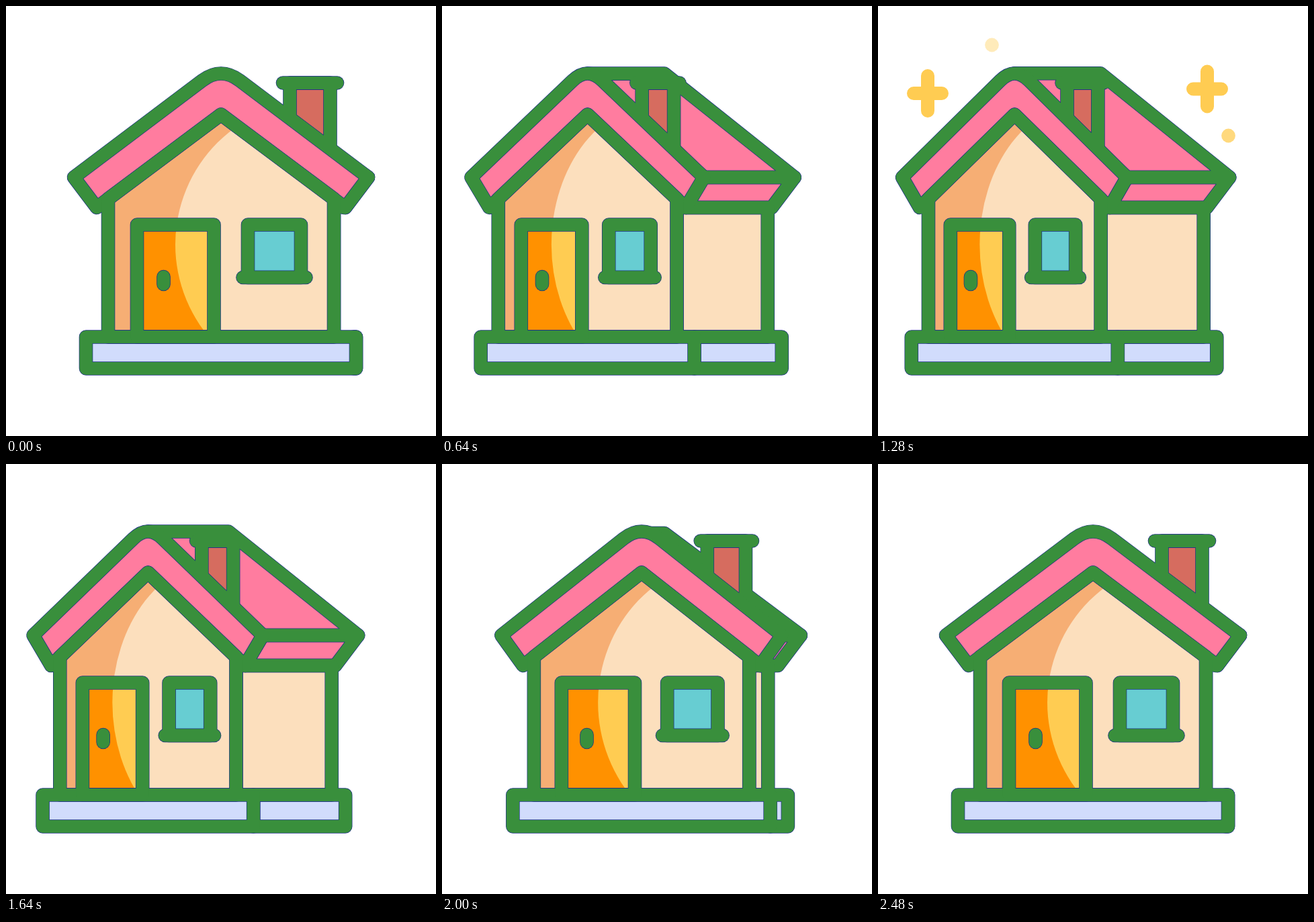
An HTML page with a canvas that plays this animation: 640x640 px, repeating every 3000 ms.

```html
<!DOCTYPE html>
<html>
<head>
<meta charset="utf-8">
<style>
  html, body { margin: 0; width: 100%; height: 100%; overflow: hidden; background: #fff; }
  canvas { display: block; }
</style>
</head>
<body>
<canvas id="stage" width="640" height="640"></canvas>
<script>
const ctx = document.getElementById('stage').getContext('2d');
const inkLayer = document.createElement('canvas');
inkLayer.width = inkLayer.height = 640;
const ink = inkLayer.getContext('2d');
ink.lineCap = ink.lineJoin = 'round';

const GREEN = '#398f3c', NAVY = '#1c2f86', PINK = '#ff7c9f', CREAM = '#fcdfbd', SHADE = '#f6ae74',
      LILAC = '#d1dcfc', BRICK = '#d66c5f', GLASS = '#67cdd2', ORANGE = '#ff9100', YELLOW = '#ffcc52';
const LOOP = 3000, STEP = 40, TURN = 1160, END = 2480, MAX_SQUEEZE = 0.237, PIVOT = -174;

const clamp = v => Math.min(1, Math.max(0, v));
const ramp = (t, from, to) => clamp((t - from) / (to - from));

function bezier(x1, y1, x2, y2) {
  const at = (a, b, u) => 3 * (1 - u) * (1 - u) * u * a + 3 * (1 - u) * u * u * b + u * u * u;
  return x => {
    let lo = 0, hi = 1;
    for (let i = 0; i < 24; i++) {
      const mid = (lo + hi) / 2;
      if (at(x1, x2, mid) < x) lo = mid; else hi = mid;
    }
    return at(y1, y2, (lo + hi) / 2);
  };
}
const easeTurn = bezier(0.6, 0.08, 0.03, 1);
const easeReturn = bezier(1, 0, 0.22, 1);

function squeezeAt(t) {
  if (t <= 0 || t >= END) return 0;
  return MAX_SQUEEZE * (t < TURN ? easeTurn(t / TURN) : 1 - easeReturn((t - TURN) / (END - TURN)));
}

function buildHouse(p) {
  const scale = 1 - p;
  const X = x => PIVOT + (x - PIVOT) * scale;
  // Path whose x coordinates follow the turning front
  const front = d => new Path2D(d.replace(/([\d.]+),/g, (_, x) => X(+x) + ','));
  const tip = 536.5 - 56 * p, eave = tip - 34, baseEnd = 517.5 - 56 * p;
  const wallEnd = 485.4 - 3 * p, ridge = 103.8 - 15 * p;
  const light = new Path2D();
  light.ellipse(X(466.5), 355, 214.5 * scale, 214.5, 0, 0, 7);
  return {
    light,
    backSlope: new Path2D(`M${X(320)},${ridge}L331,${ridge}L${tip},255L${X(539)},255Z`),
    backEave: new Path2D(`M${X(539)},255L${tip},255L${eave},300L${X(505)},300Z`),
    backWall: new Path2D(`M${X(488)},300L${wallEnd},300L${wallEnd},492.5L${X(488)},492.5Z`),
    backBase: new Path2D(`M${X(521)},492.5L${baseEnd},492.5L${baseEnd},539.5L${X(521)},539.5Z`),
    chimney: front('M422.5,167L422.5,114.5L482.5,114.5L482.5,212Z'),
    chimneyCap: front('M412,114.5L493,114.5'),
    roof: front('M101,255L292,111Q320,90 348,111L539,255L505,300L320,161.5L135,300Z'),
    wall: front('M152,287L320,161.5L488,287L488,492.5L152,492.5Z'),
    base: front('M119,492.5L521,492.5L521,539.5L119,539.5Z'),
    door: front('M195,325.5L309.5,325.5L309.5,492.5L195,492.5Z'),
    knob: front('M234.5,403L234.5,414'),
    pane: front('M360,325.5L439,325.5L439,404L360,404Z'),
    sill: front('M352.5,404L446.5,404')
  };
}

function fill(path, color) {
  ctx.fillStyle = color;
  ctx.fill(path);
}

function fillLit(path, dark, bright, light) {
  fill(path, dark);
  ctx.save();
  ctx.clip(path);
  fill(light, bright);
  ctx.restore();
}

// Nearer parts erase farther lines, so touching outlines merge
function drawInk(h, color, width) {
  const stroke = (...paths) => paths.forEach(path => ink.stroke(path));
  const erase = (...paths) => {
    ink.globalCompositeOperation = 'destination-out';
    paths.forEach(path => ink.fill(path));
    ink.globalCompositeOperation = 'source-over';
  };
  ink.clearRect(0, 0, 640, 640);
  ink.strokeStyle = color;
  ink.lineWidth = width;
  stroke(h.backSlope, h.backEave, h.backWall, h.backBase);
  erase(h.chimney);
  stroke(h.chimney, h.chimneyCap);
  erase(h.roof, h.wall, h.base);
  stroke(h.roof, h.wall, h.base, h.door, h.knob, h.pane, h.sill);
  ctx.drawImage(inkLayer, 0, 0);
}

function drawPlus(x, y, size) {
  if (!size) return;
  ctx.save();
  ctx.translate(x, y);
  ctx.scale(size, size);
  ctx.strokeStyle = YELLOW;
  ctx.lineWidth = 20;
  ctx.lineCap = 'round';
  ctx.stroke(new Path2D('M-21,0H21M0,-26V26'));
  ctx.restore();
}

function drawDot(x, y, alpha) {
  ctx.globalAlpha = alpha;
  ctx.fillStyle = YELLOW;
  ctx.beginPath();
  ctx.arc(x, y, 10.4, 0, 7);
  ctx.fill();
  ctx.globalAlpha = 1;
}

function draw(t) {
  const h = buildHouse(squeezeAt(t));
  ctx.fillStyle = '#fff';
  ctx.fillRect(0, 0, 640, 640);

  const size = ramp(t, 720, 920) * (1 - ramp(t, 1360, 1560));
  drawPlus(74, 130, size);
  drawPlus(490, 123.5, size);
  drawDot(169.5, 58, ramp(t, 720, 920) * (1 - ramp(t, 1160, 1360)));
  drawDot(521.5, 193, ramp(t, 800, 1000) * (1 - ramp(t, 1220, 1460)));

  fill(h.backSlope, PINK);
  fill(h.backEave, PINK);
  fill(h.backWall, CREAM);
  fill(h.backBase, LILAC);
  fill(h.chimney, BRICK);
  fillLit(h.wall, SHADE, CREAM, h.light);
  fillLit(h.door, ORANGE, YELLOW, h.light);
  fill(h.pane, GLASS);
  fill(h.roof, PINK);
  fill(h.base, LILAC);

  drawInk(h, NAVY, 20.6);
  drawInk(h, GREEN, 19.2);
}

const start = performance.now();
function tick() {
  const t = (performance.now() - start) % LOOP;
  draw(Math.floor(t / STEP) * STEP);
  requestAnimationFrame(tick);
}
tick();
</script>
</body>
</html>
```
